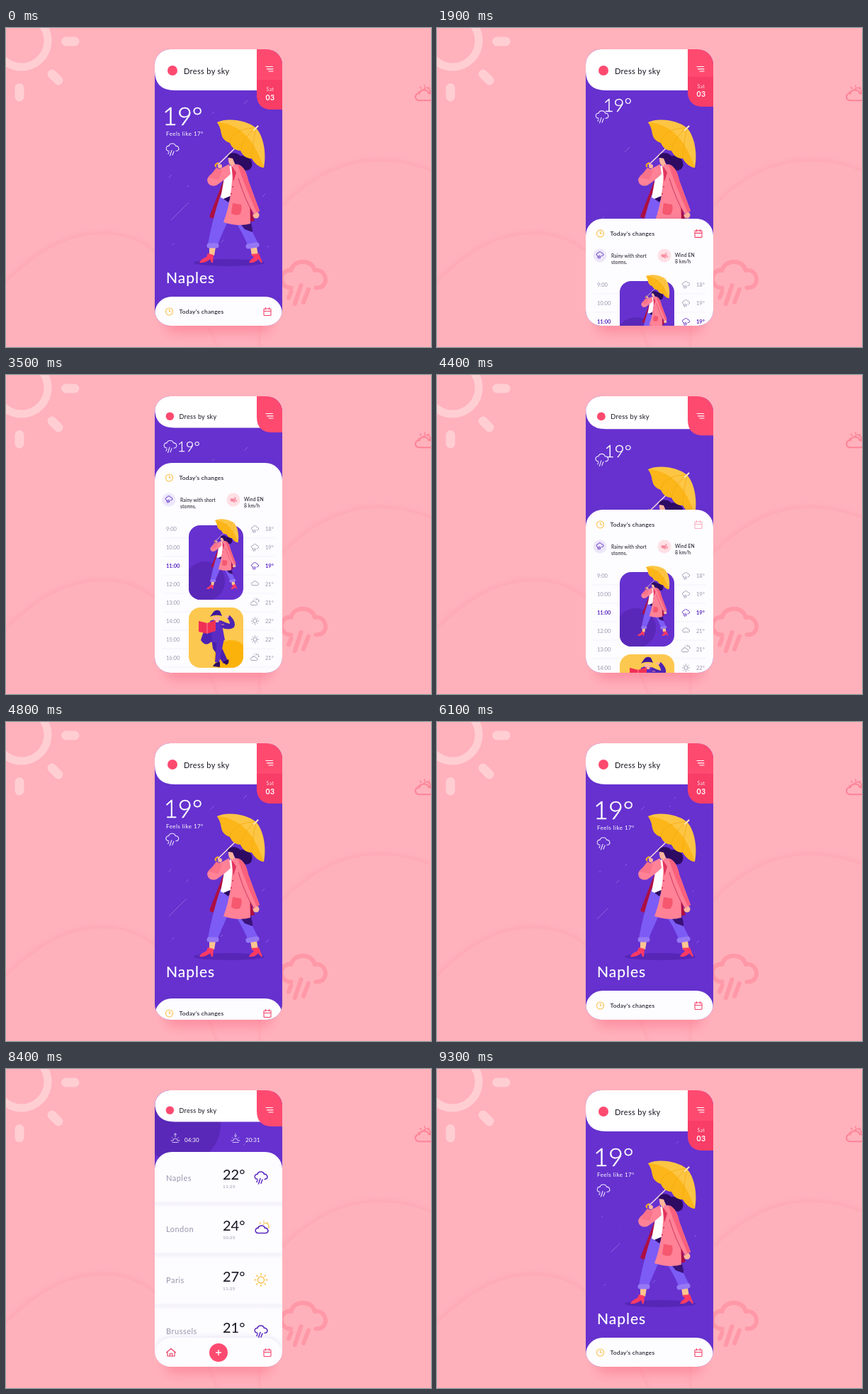
Animation of 600 by 450 pixels, one loop 9.4 s. Source, as an HTML page:

```html
<!DOCTYPE html>
<html lang="en">
<head>
<meta charset="utf-8">
<title>Weather app</title>
<style>
html, body { margin: 0; width: 100%; height: 100%; overflow: hidden; background: #ffb1bc; }
svg { display: block; width: 600px; height: 450px; font-family: Lato, "Open Sans", sans-serif; }
.ico { fill: none; stroke: currentColor; stroke-linecap: round; stroke-linejoin: round; }
</style>
</head>
<body>
<svg id="stage" viewBox="0 0 600 450" xmlns="http://www.w3.org/2000/svg"></svg>
<script>
const LOOP = 9400;
const PURPLE = '#6631cf', INDIGO = '#5a28c0', RED = '#ff4a70', GREY = '#9a97ad', INK = '#17131f';

// ---- markup helpers
const text = (x, y, size, fill, str, more = '') =>
  `<text x="${x}" y="${y}" font-size="${size}" fill="${fill}" ${more}>${str}</text>`;
const icon = (name, x, y, scale, color, width = 1.2) =>
  `<use href="#${name}" class="ico" transform="translate(${x} ${y}) scale(${scale})" style="color:${color};stroke-width:${width / scale}"/>`;
const shape = (d, fill) => `<path d="${d}" fill="${fill}"/>`;
const rays = (r1, r2, from, to) => {
  let d = '';
  for (let a = from; a <= to; a += 45) {
    const c = Math.cos(a * Math.PI / 180), s = Math.sin(a * Math.PI / 180);
    d += `M${(c * r1).toFixed(1)} ${(s * r1).toFixed(1)}L${(c * r2).toFixed(1)} ${(s * r2).toFixed(1)}`;
  }
  return d;
};
const hill = d => `<path d="${d}" fill="none" stroke="#fb9dac" stroke-opacity=".5" stroke-width="6" filter="url(#haze)"/>` +
  shape(d, '#ffb1bb');

const cloud = 'M-5 3C-8.5 3-10-.5-8-3C-7-4-6-4.3-5-4C-4-8.7 3.5-8.7 4.5-4C8-4.8 10.2-.5 8 2C7.3 2.8 6.5 3 5 3';
const defs = `<defs>
  <clipPath id="phone"><rect x="210" y="30" width="180" height="390" rx="22"/></clipPath>
  <clipPath id="cardA"><rect x="258" y="88" width="77" height="105" rx="16"/></clipPath>
  <clipPath id="cardB"><rect x="258" y="204" width="77" height="85" rx="16"/></clipPath>
  <filter id="soft" x="-30%" y="-60%" width="160%" height="220%"><feGaussianBlur stdDeviation="8"/></filter>
  <filter id="haze"><feGaussianBlur stdDeviation="3"/></filter>
  <linearGradient id="edge" x1="0" y1="0" x2="0" y2="1">
    <stop offset="0" stop-color="#f4f2f9" stop-opacity="0"/><stop offset=".4" stop-color="#f4f2f9"/>
    <stop offset="1" stop-color="#f4f2f9" stop-opacity="0"/></linearGradient>
  <path id="rain" d="${cloud}M-5 4.5L-6 7M-1 2L-3.5 9.5M2 3.6L0 8.8"/>
  <path id="cloud" d="${cloud}H-5"/>
  <path id="sun" d="M4.5 0A4.5 4.5 0 1 1-4.5 0A4.5 4.5 0 1 1 4.5 0${rays(7, 9, 0, 315)}"/>
  <path id="halfSun" d="M-1-3.5A4.5 4.5 0 1 1 7 2${rays(7, 9, 180, 360)}"/>
  <path id="wind" d="M-8-2H3C7-2 7-7 3.5-6.5M-8 1H7C10 1 10 5 7 5M-6 4H2C5 4 4 8 1.5 7"/>
  <path id="cal" d="M-5-3.5Q-5-4.5-4-4.5H4Q5-4.5 5-3.5V4Q5 5 4 5H-4Q-5 5-5 4ZM-5-1H5M-2.5-6V-3.5M2.5-6V-3.5"/>
  <path id="clock" d="M5 0A5 5 0 1 1-5 0A5 5 0 1 1 5 0M0-3V0H2.5"/>
  <path id="home" d="M-6.5 0L0-5.5L6.5 0M-5-1V5H5V-1M-1.6 5V1.2H1.6V5"/>
  <path id="rise" d="M-6 4H-3A3 3 0 0 1 3 4H6M-4 6.5H4M-4.6-.4L-3.8.4M4.6-.4L3.8.4M0-1.5V-6M-1.6-4.6L0-6L1.6-4.6"/>
  <path id="set" d="M-6 4H-3A3 3 0 0 1 3 4H6M-4 6.5H4M-4.6-.4L-3.8.4M4.6-.4L3.8.4M0-6V-1.5M-1.6-3L0-1.5L1.6-3"/>
  <g id="woman">
    ${shape('M328 181C338 178 350 185 347 195C344 204 333 201 329 196Z', '#2d0b63')}
    <path d="M356 138L299 193" stroke="#ffe3dc" stroke-width="1.4"/>
    ${shape('M298 133C313 126 340 130 353 141C364 153 368 178 364 197Q354 196 347 184Q337 185 331 173Q321 173 316 162Q306 159 304 149Q303 140 298 133Z', '#fdc544')}
    ${shape('M298 133C316 134 331 143 338 151C350 162 358 180 364 197Q354 196 347 184Q337 185 331 173Q321 173 316 162Q306 159 304 149Q303 140 298 133Z', '#fcb619')}
    <path d="M353 141C330 141 318 150 316 162M353 141C340 150 333 162 331 173M353 141C350 156 347 170 347 184" fill="none" stroke="#f3a70c" stroke-width=".7"/>
    <path d="M350 144L355.500 138.500" stroke="#ffe9c8" stroke-width="1.800" stroke-linecap="round"/>
    ${shape('M313 183C313 175 326 174 331 181L333 196Q328 199 324 192L319 184Z', '#2d0b63')}
    ${shape('M314 183L320 184L324 194L318 195Q313 190 314 183Z', '#ffb59b')}
    ${shape('M307 215L287 266Q293 271 305 269L314 236Z', '#ad0f42')}
    ${shape('M336 225L351 272L343 274Z', '#ad0f42')}
    ${shape('M312 240L340 258Q347 274 348 289L330 284Z', '#3a1278')}
    ${shape('M303 235L323 240C317 270 304 290 299 306L285 305C290 280 294 262 303 235Z', '#7c5cf5')}
    ${shape('M320 268L343 278L356 304L342 308Q334 288 320 268Z', '#7c5cf5')}
    ${shape('M326 270L345 274Q348 280 348 288L337 284Z', '#3a1278')}
    ${shape('M287 309H296L294 321H287ZM345 309H354L356 321H347Z', '#ffc58f')}
    <path d="M287 307H297M342 308L354 306" stroke="#9678f5" stroke-width="7" stroke-linecap="round"/>
    ${shape('M285 318L293 320L292 331H290L288 326Q282 332 273 331Q275 326 283 323ZM346 319L357 318L362 331H360L356 326Q352 332 343 331Q345 326 350 324Z', '#ff3a63')}
    ${shape('M310 195L322 194V240Q312 245 303 239Q308 215 310 195Z', '#fff')}
    ${shape('M307 241L319 236L314 246Z', '#2d0b63')}
    ${shape('M320 193Q330 190 335 198Q345 225 345 276Q328 281 307 274Q320 240 320 193Z', '#ff8297')}
    ${shape('M318 193L325 204L321 217Z', '#e2355f')}
    ${shape('M320 247L332 249Q334 258 330 263Q322 265 318 261Z', '#f5586f')}
    ${shape('M315 192C303 199 287 204 284 214Q285 225 297 222Q309 214 317 206Z', '#ff8297')}
    ${shape('M286 211L297 197L305 201L300 214Z', '#f9738a')}
    <path d="M300 190Q293 193 297 196" fill="none" stroke="#f9b010" stroke-width="2"/>
    <circle cx="302" cy="195" r="3" fill="#ffb59b"/><circle cx="353" cy="264" r="4.500" fill="#ffb59b"/>
    ${shape('M327 193Q338 195 342 215L358 258L350 263Q336 240 328 212Z', '#ff8297')}
    ${shape('M327 193Q338 195 342 215L358 258L354 260Q338 226 327 193Z', '#f9607c')}
    <path d="M328 212Q338 244 350 263" fill="none" stroke="#c22552" stroke-width=".8"/>
    <path d="M320 224V224.100M318 234V234.100" stroke="#c22552" stroke-width="1.800" stroke-linecap="round"/>
  </g>
  <g id="man">
    ${shape('M290 372H299L313 403L307 407L292 386Z', '#4a21ab')}
    ${shape('M298 372H308L301 405H295Z', '#5a2cc4')}
    ${shape('M306 405L314 401Q316 406 311 409ZM292 411Q296 404 302 405V412Z', '#2d0b63')}
    ${shape('M288 347Q296 343 304 347L309 374Q297 380 285 375Z', '#5a2cc4')}
    ${shape('M289 348Q279 358 275 374Q282 385 291 375Z', '#4d23b4')}
    ${shape('M303 346Q311 350 316 351Q316 347 312 342L316 339Q326 349 322 356Q314 361 304 356Z', '#4d23b4')}
    ${shape('M292 341H302L300 349H295ZM308 341Q312 337 315 341L313 343Z', '#ffb59b')}
    ${shape('M288 341Q296 337 305 340L302 333Q297 330 293 334Z', '#3d189b')}
    ${shape('M272 347L284 350L296 346V361L284 365L272 362Z', '#f03055')}
    <path d="M284 350V365M304 352H308" stroke="#ff8b9d"/>
  </g>
</defs>`;

const backdrop = `
  <rect width="600" height="450" fill="#ffb1bc"/>
  ${hill('M-8 368C45 312 90 291 138 291C205 291 255 345 300 460H-8Z')}
  ${hill('M360 290C410 220 470 188 525 188C560 188 585 196 610 207V460H360Z')}
  <g fill="none" stroke="#ffced3" stroke-linecap="round">
    <circle cx="22" cy="18" r="37" stroke-width="11"/>
    <path d="M84.500 19H97M65 65L74 74M19 84.500V97" stroke-width="13"/>
  </g>
  ${icon('rain', 420, 356, 3.5, '#ff98a7', 6)}
  ${icon('cloud', 590.5, 98, 1.4, '#fd8396', 2)}
  ${icon('halfSun', 591, 90, 1, '#fd8396', 1.6)}
  <rect x="224" y="400" width="152" height="30" rx="15" fill="#fb7890" opacity=".6" filter="url(#soft)"/>`;

const home = `
  <rect x="210" y="30" width="180" height="390" fill="${PURPLE}"/>
  <circle id="disc" cx="247" cy="78" r="56" fill="#5928b8"/>
  <g id="drops" stroke="#b79bf0" stroke-width=".8" opacity=".6"></g>
  <g id="now" fill="#fff">
    <g id="temp">${text(0, 0, 36, '#fff', '19°', 'font-weight="300" stroke="#fff" stroke-width=".5"')}</g>
    <g id="feels">${text(226, 151.5, 8, '#fff', 'Feels like 17°', 'letter-spacing=".45"')}</g>
    <g id="nowIcon">${icon('rain', 0, 0, 1, '#efe8ff', 1.1)}</g>
  </g>
  <ellipse cx="315" cy="331" rx="50" ry="5" fill="#5626b6"/>
  <use href="#woman"/>
  ${text(226, 360, 21, '#fff', 'Naples', 'letter-spacing="1" stroke="#fff" stroke-width=".2"')}`;

const cities = [
  ['Naples', 22, '11:25', icon('rain', 360, -1, 1, INDIGO, 1.5)],
  ['London', 24, '10:25', icon('halfSun', 364, -3, .9, '#fcc24a', 1.2) +
    `<g fill="#fdfcff">${icon('cloud', 361, 3, 1, INDIGO, 1.6)}</g>`],
  ['Paris', 27, '11:25', icon('sun', 360, 0, 1, '#fcc24a', 1.4)],
  ['Brussels', 21, '11:25', icon('rain', 360, 0, 1, INDIGO, 1.5)]
];
const list = `<g id="list">
  <g id="sunTimes">
    ${icon('rise', 239, -20, 1, '#e4d8ff', .9)}${text(252, -14, 8, '#fff', '04:30')}
    ${icon('set', 324, -20, 1, '#e4d8ff', .9)}${text(338, -14, 8, '#fff', '20:31')}
  </g>
  <rect x="210" width="180" height="420" rx="24" fill="#fdfcff"/>
  ${cities.map(([name, deg, time, pic]) => `<g class="city">
    <rect x="210" y="32" width="180" height="10" fill="url(#edge)"/>
    ${text(226, 4, 11, GREY, name, 'letter-spacing=".5"')}
    ${text(306, 2, 20, INK, deg + '°')}
    ${text(306, 14.5, 6.5, GREY, time, 'letter-spacing=".2"')}${pic}</g>`).join('')}
</g>`;

const hours = ['rain', 'rain', 'rain', 'cloud', 'part', 'sun', 'sun', 'part'];
const degrees = [18, 19, 19, 21, 21, 22, 22, 21];
const hourRows = hours.map((kind, i) => {
  const y = 93 + 26 * i, on = i === 2, col = on ? INDIGO : GREY;
  const bold = on ? 'font-weight="700"' : '';
  const pic = kind === 'part'
    ? icon('cloud', 350, y + 2, .55, col, .9) + icon('halfSun', 353, y - 2, .5, col, .8)
    : icon(kind, 351.5, y, .58, col, .9);
  return text(226, y + 2.8, 7.5, col, `${9 + i}:00`, bold) + pic +
    text(366, y + 3, 7.5, col, degrees[i] + '°', bold) +
    `<path d="M220 ${y + 13}H380" stroke="#f0eef5" stroke-width=".8"/>`;
}).join('');

const note = (x, y, str) => text(x, y, 6.8, INK, str, 'letter-spacing=".1"');
const sheet = `<g id="sheet">
  <rect x="210" width="180" height="440" rx="24" fill="#fdfcff" style="filter:drop-shadow(0 -2px 3px rgba(90,60,160,.1))"/>
  <g id="today">
    ${icon('clock', 230.5, 21, 1, '#fcc24a', 1.1)}
    ${text(244.5, 24, 8.4, INK, 'Today’s changes', 'letter-spacing=".25" font-weight="500"')}
    <circle cx="230" cy="52" r="9.500" fill="#ede7fb"/>${icon('rain', 230, 51, .55, INDIGO, 1)}
    <circle cx="321" cy="52" r="9.500" fill="#ffe0e5"/>${icon('wind', 321, 52, .5, '#f0486c', .8)}
    ${note(246, 55, 'Rainy with short')}${note(246, 64, 'storms.')}
    ${note(336, 54, 'Wind EN')}${note(336, 63, '8 km/h')}
    ${hourRows}
    <g clip-path="url(#cardA)"><rect x="258" y="88" width="77" height="105" fill="${PURPLE}"/>
      <circle cx="281" cy="167" r="28" fill="#5928b8"/></g>
    <use href="#woman" transform="translate(149.150 15.800) scale(.49)"/>
    <g clip-path="url(#cardB)"><rect x="258" y="204" width="77" height="85" fill="#fdc84f"/>
      <circle cx="318" cy="274" r="24" fill="#fbb30c"/></g>
    <use href="#man" transform="translate(0 -124)"/>
  </g>
  <g id="date0">${icon('cal', 369, 21.5, 1, '#f5426a', 1.1)}</g>
  <g id="nav">${icon('home', 233, 21, 1, '#e8385f', 1.1)}
    <g id="add"><circle r="13" fill="${RED}"/><path d="M-4 0H4M0-4V4" stroke="#fff" stroke-width="1.400"/></g>
  </g>
</g>`;

const header = `
  <path id="bar" fill="#fff"/>
  <g id="brand"><circle cx="-16" cy="-1" r="7" fill="${RED}"/>
    ${text(0, 3.8, 11, INK, 'Dress by sky', 'letter-spacing=".35"')}</g>
  <path id="tab" fill="${RED}"/>
  <g id="date"><path d="M354 73H390V115H376Q354 115 354 93Z" fill="#f83d66"/>
    <g text-anchor="middle">${text(373, 89, 7, '#ffe3e8', 'Sat', 'letter-spacing=".4"')}
    ${text(373, 101.500, 10.5, '#fff', '03', 'font-weight="700" letter-spacing=".5"')}</g></g>
  <path d="M367 54.500H376.500M368.500 57.800H377M371 61H377" stroke="#fff" stroke-width="1.200" stroke-linecap="round"/>`;

document.getElementById('stage').innerHTML =
  defs + backdrop + `<g clip-path="url(#phone)">${home}${list}${sheet}${header}</g>`;

// ---- motion
const $ = id => document.getElementById(id);
const set = (id, name, value) => $(id).setAttribute(name, value);
const clamp = v => Math.min(1, Math.max(0, v));
const mix = (a, b, p) => a + (b - a) * p;
const move = (id, x, y, s = 1) => set(id, 'transform', `translate(${x} ${y}) scale(${s})`);
const easeOut = u => 1 - (1 - u) ** 2;
const easeBoth = u => u < .5 ? 2 * u * u : 1 - 2 * (1 - u) ** 2;

// Damped spring that peaks 500 ms after its start.
function spring(ms, k) {
  if (ms <= 0) return 0;
  const a = ms / 500 * Math.PI;
  return 1 - Math.exp(-k * a) * (Math.cos(a) + k * Math.sin(a));
}
const ramp = (t, start, dur, ease) => ease(clamp((t - start) / dur));

const DAY = [1757, 4300], CITY = [6300, 8450];
const sprung = (t, [on, off], k, kOff = k) => spring(t - on, k) - spring(t - off, kOff);
const eased = (t, [on, off], delay, dur) =>
  ramp(t, on + delay, dur, easeBoth) - ramp(t, off, dur, easeBoth);

// Rain: x, y of the upper end, length, phase
const RAIN_STEP = LOOP / 8;
const drops = [
  [258, 246, 25, 975], [341, 102, 5, 960], [234, 207, 4, 960], [366, 234, 4, 930],
  [238, 303, 3, 900], [308, 298, 4, 880], [294, 118, 5, 1060], [371, 307, 4, 1050],
  [258, 222, 4, 1040], [238, 264, 6, 360], [280, 160, 12, 300], [376, 150, 9, 220],
  [247, 320, 14, 250], [376, 340, 8, 340], [268, 200, 6, 140], [330, 118, 8, 180]
].map(d => {
  const line = document.createElementNS('http://www.w3.org/2000/svg', 'path');
  $('drops').append(line);
  return { d, line };
});

function drawRain(t) {
  for (const { d: [x, y, len, phase], line } of drops) {
    const u = (t - phase + LOOP) % RAIN_STEP, late = Math.max(0, u - 200);
    const head = Math.min(1, u / 200) + late * .0012, tail = (late / 280) ** 2;
    line.setAttribute('d', tail < head
      ? `M${x - len * tail} ${y + len * tail}L${x - len * head} ${y + len * head}` : '');
  }
}

const cityRows = [...document.querySelectorAll('.city')];

function draw(t) {
  drawRain(t);

  const day = sprung(t, DAY, 1), city = sprung(t, CITY, 1.1);
  const fade = clamp(city);
  move('sheet', 0, mix(379, 124, day));
  set('date0', 'opacity', 1 - clamp((day - .55) * 3));
  set('today', 'opacity', 1 - fade);
  set('nav', 'opacity', fade);
  move('add', 300, 21, Math.max(0, sprung(t, CITY, .58, 1)));

  const top = mix(425, 117, city), gap = 72 + .42 * (top - 117);
  move('list', 0, top);
  cityRows.forEach((row, i) => row.setAttribute('transform', `translate(0 ${36.5 + i * gap})`));
  set('sunTimes', 'opacity', clamp(city * 2 - 1));
  set('disc', 'opacity', fade);

  const w = ramp(t, DAY[0] - 70, 520, easeOut) - ramp(t, DAY[1], 700, easeOut);
  move('temp', mix(221, 242, w), mix(137, 108, w), mix(1, .56, w));
  move('nowIcon', mix(235, 232, w), mix(170.5, 100, w));
  move('feels', 0, -18 * w);
  set('feels', 'opacity', clamp(1.2 - w * 2));
  set('now', 'opacity', 1 - clamp(fade * 1.5));

  const bar = eased(t, DAY, 150, 400) + eased(t, CITY, 100, 400);
  const bottom = mix(88, 74.5, bar);
  set('bar', 'd', `M210 30H376V${bottom}H238Q210 ${bottom} 210 ${bottom - 28}Z`);
  move('brand', mix(251, 244.5, bar), mix(61, 59, bar), mix(1, .82, bar));

  const tab = eased(t, DAY, 43, 400) + eased(t, CITY, 40, 400);
  const low = mix(115, 81, tab);
  set('tab', 'd', `M354 30H390V${low}H376Q354 ${low} 354 ${low - 22}Z`);
  move('date', 0, low - 115);
  set('date', 'opacity', clamp(1.15 - tab * 1.5));
}

function tick() {
  draw(performance.now() % LOOP);
  requestAnimationFrame(tick);
}
tick();
</script>
</body>
</html>
```
